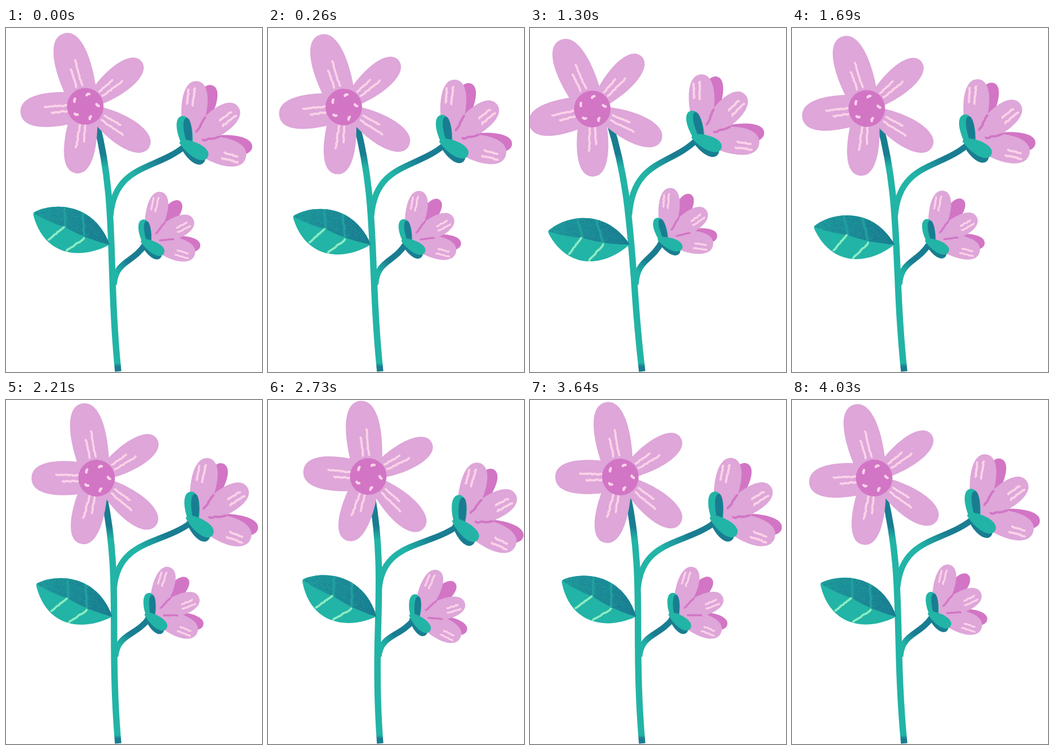
Animation of 452 by 606 pixels, one loop 4160 ms. Source, as an HTML page with a canvas:

```html
<!DOCTYPE html>
<html lang="en">
<head>
<meta charset="utf-8">
<title>Swaying flower</title>
<style>
html, body { margin: 0; width: 100%; height: 100%; overflow: hidden; background: #fff; }
canvas { display: block; }
</style>
</head>
<body>
<canvas id="stage" width="452" height="606"></canvas>
<script>
const ctx = document.getElementById('stage').getContext('2d');
const STEP = 130, STEPS = 32, RAD = Math.PI / 180;
const PETAL = '#dea6d9', PINK = '#d275c5', PALE = '#fbd2e8';
const TEAL = '#22b4a6', DARK = '#197d91', MINT = '#8cecc2';

// Sideways lean of the flower head: [step, px]
const LEAN = [[0, 0], [5, -15], [10, -30], [13, -8], [17, 20], [21, 37], [25, 32], [31, 5]];

let seed = 1;
function rnd() {
  seed = (seed * 16807) % 2147483647;
  return seed / 2147483647;
}

// Periodic cubic spline through the lean keys
function lean(step) {
  const n = LEAN.length, s = (step + STEPS) % STEPS;
  const key = i => {
    const [k, px] = LEAN[(i + n) % n];
    return [k + STEPS * Math.floor(i / n), px];
  };
  const slope = i => {
    const [a, p] = key(i - 1), [b, q] = key(i + 1);
    return (q - p) / (b - a);
  };
  let i = n - 1;
  while (LEAN[i][0] > s) i--;
  const [a, p] = key(i), [b, q] = key(i + 1);
  const h = b - a, t = (s - a) / h, u = 1 - t;
  return u * u * (1 + 2 * t) * p + t * t * (3 - 2 * t) * q + h * t * u * (u * slope(i) - t * slope(i + 1));
}

// The stem yields more the higher up it is
const stemShift = (y, u) => 0.64 * ((605 - y) / 439) ** 1.5 * u;

function place(x, y, deg, draw) {
  ctx.save();
  ctx.translate(x, y);
  ctx.rotate(deg * RAD);
  draw();
  ctx.restore();
}

function stroke(color, width) {
  ctx.strokeStyle = color;
  ctx.lineWidth = width;
  ctx.stroke();
}

// Uneven crayon mark
function mark(color, width, x1, y1, x2, y2) {
  const len = Math.hypot(x2 - x1, y2 - y1), n = Math.ceil(len / 3);
  ctx.beginPath();
  for (let i = 0; i <= n; i++) {
    const t = i / n, j = (rnd() - 0.5) * 1.8 / len;
    ctx.lineTo(x1 + (x2 - x1) * t - (y2 - y1) * j, y1 + (y2 - y1) * t + (x2 - x1) * j);
  }
  ctx.lineCap = ctx.lineJoin = 'round';
  stroke(color, width);
}

// Egg shape from its root at (x, y); root = relative width there
function petal(color, x, y, deg, len, width, root = 0.3, details) {
  place(x, y, deg, () => {
    const b = root * width / 2, c = (width / 2 - b / 8) / 0.75;
    ctx.beginPath();
    ctx.moveTo(0, -b);
    ctx.bezierCurveTo(len * 0.45, -c, len, -c, len, 0);
    ctx.bezierCurveTo(len, c, len * 0.45, c, 0, b);
    ctx.fillStyle = color;
    ctx.fill();
    if (details) details(len);
  });
}

function fade(x1, y1, x2, y2, ...stops) {
  const g = ctx.createLinearGradient(x1, y1, x2, y2);
  stops.forEach(([at, color]) => g.addColorStop(at, color));
  return g;
}

function drawBranch(y, u, bud, bow, from) {
  const x = 198 - (605 - y) * 0.049 + stemShift(y, u);
  const ex = bud.x - 10 * bud.size, ey = bud.y + 6 * bud.size;
  const dx = ex - x, dy = ey - y;
  ctx.beginPath();
  ctx.moveTo(x, y);
  ctx.bezierCurveTo(x + dx * 0.06, y + dy * bow, x + dx * 0.61, y + dy * bow * 0.88, ex, ey);
  ctx.lineCap = 'butt';
  stroke(fade(x, y, ex, ey, [from, TEAL], [from + 0.2, '#1d919a'], [from + 0.3, DARK]), 10.5);
}

function drawStem(u) {
  const at = (x, y) => [x + stemShift(y, u), y];
  ctx.beginPath();
  ctx.moveTo(...at(198, 605));
  ctx.quadraticCurveTo(...at(190.5, 530), ...at(188, 440));
  ctx.bezierCurveTo(...at(184.5, 350), ...at(185.5, 270), ...at(160, 168));
  ctx.lineCap = 'butt';
  stroke(fade(0, 180, 0, 605, [0.1, DARK], [0.155, TEAL], [0.965, TEAL], [0.98, DARK]), 11.4);
}

function drawLeaf() {
  ctx.save();
  ctx.beginPath();
  ctx.moveTo(-132, -58);
  ctx.bezierCurveTo(-97, -76, -26, -74, 1, 0);
  ctx.bezierCurveTo(-50, 27, -114, 20, -133, -52);
  ctx.quadraticCurveTo(-134, -56, -132, -58);
  ctx.fillStyle = TEAL;
  ctx.fill();
  ctx.clip();
  ctx.beginPath();
  ctx.moveTo(-134, -57);
  ctx.quadraticCurveTo(-104, -39, -77, -31);
  ctx.quadraticCurveTo(-44, -11, 3, 1);
  ctx.lineTo(8, -82);
  ctx.lineTo(-134, -82);
  ctx.clip();
  ctx.fillStyle = fade(-122, -57, -7, -12, [0, '#1e989b'], [0.5, '#1c8b96'], [1, DARK]);
  ctx.fill();
  for (let i = 0; i < 700; i++) {
    ctx.fillStyle = rnd() < 0.5 ? 'rgba(25,118,142,.45)' : 'rgba(34,165,160,.4)';
    ctx.fillRect(-134 + rnd() * 135, -70 + rnd() * 72, 1.8, 1.8);
  }
  mark('#229f9f', 4, -78, -66, -77, -32);
  mark('#229f9f', 4, -46, -60, -44, -13);
  ctx.restore();
  mark(MINT, 3.8, -107, -10, -79, -31);
  mark(MINT, 3.8, -75, 10, -44, -11);
}

function drawFlower() {
  const streaks = len => {
    mark(PALE, 3.8, len * 0.28, -5, len * 0.52, -6);
    mark(PALE, 3.8, len * 0.28, 5, len * 0.62, 6);
  };
  // angle, length, width, root
  [[-106, 134, 60, 0.75], [-38, 127, 48, 0.25], [33.5, 134, 51, 0.2], [98.5, 119, 54, 0.75], [175, 115, 58, 0.8]]
    .forEach(p => petal(PETAL, 0, 0, ...p, streaks));
  ctx.beginPath();
  ctx.arc(0, 0, 32.3, 0, Math.PI * 2);
  ctx.fillStyle = PINK;
  ctx.fill();
  for (let i = 0; i < 5; i++) {
    place(0, 0, i * 72 - 5, () => mark(PALE, 4.5, 20, -2, 23, 2));
  }
}

// Angles: top, middle and low petal, then the two behind
function drawBud([top, mid, low, backTop, backLow]) {
  const streaks = off => len => {
    mark(PALE, 4, len * 0.62, off, len * 0.85, off);
    mark(PALE, 4, len * 0.6, off + 10, len * 0.88, off + 10);
  };
  const fold = (a, b) => place(0, 0, (a + b) / 2, () => mark(PINK, 4, 22, 0, 51, 0));
  petal(PINK, 0, 0, backTop, 108, 36);
  petal(PINK, 0, 0, backLow, 109, 36);
  petal(PETAL, 0, 0, top, 109, 45, 0.4, streaks(-13));
  petal(PETAL, 0, 0, mid, 105, 45, 0.4, streaks(0));
  petal(PETAL, 0, 0, low, 101, 48, 0.4, streaks(2));
  fold(top, mid);
  fold(mid, low);
  petal(TEAL, -4, 12, -101, 60, 26, 0.5);
  petal(DARK, -1, 10, -97, 54, 14);
  petal(DARK, -16, 4, 38, 50, 24);
  petal(TEAL, -18, -3, 31, 56, 25);
}

function draw(step) {
  seed = 4711;
  ctx.fillStyle = '#fff';
  ctx.fillRect(0, 0, 452, 606);
  const u = lean(step), late = lean(step - 1.5), drift = u * (1 - 0.005 * u);
  const buds = [
    { x: 326 + 0.62 * drift, y: 202 + 0.38 * u, tilt: 0.245 * u, size: 1, fan: [-84, -37, 15, -69, 4] },
    { x: 254 + 0.37 * drift, y: 376 + 0.17 * u, tilt: 0.275 * u, size: 0.82, fan: [-77, -27, 16, -53, 5] }
  ];
  drawBranch(330, u, buds[0], 0.74, 0.42);
  drawBranch(452, u, buds[1], 0.6, 0.22);
  drawStem(u);
  place(182 + stemShift(381, u), 381.5, 0.3 * late * (1 - 0.012 * late) - 2.5, drawLeaf);
  for (const b of buds) {
    place(b.x, b.y, b.tilt, () => {
      ctx.scale(b.size, b.size);
      drawBud(b.fan);
    });
  }
  place(140 + u, 139 - 0.13 * late, 0.28 * u - 0.6, drawFlower);
}

const start = performance.now();
let shown = -1;
function tick() {
  const s = Math.floor((performance.now() - start) / STEP) % STEPS;
  if (s !== shown) draw(shown = s);
  requestAnimationFrame(tick);
}
tick();
</script>
</body>
</html>
```
